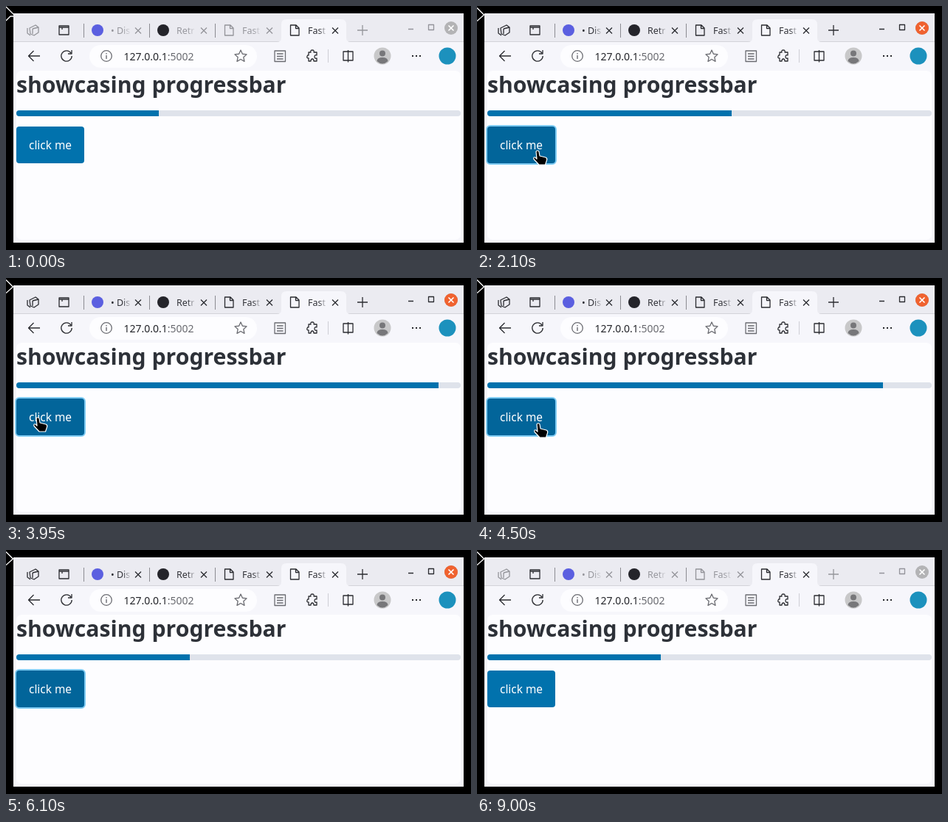
An HTML page that plays this animation: 630x332 px, repeating every 9050 ms.

```html
<!DOCTYPE html>
<html lang="en">
<head>
<meta charset="utf-8">
<title>Progress bar</title>
<style>
  html, body { margin: 0; width: 100%; height: 100%; overflow: hidden; background: #000; }
  svg { display: block; width: 630px; height: 332px; font-family: "Noto Sans", sans-serif; }
  .line { fill: none; stroke: #2b2c31; stroke-width: 1.3; stroke-linejoin: round; }
  .soft { stroke: #6b6c72; }
</style>
</head>
<body>
<svg viewBox="0 0 630 332">
  <defs>
    <linearGradient id="fade">
      <stop offset=".6" stop-color="#303137"/>
      <stop offset="1" stop-color="#303137" stop-opacity=".15"/>
    </linearGradient>
    <clipPath id="track"><rect x="14" y="142" width="602" height="8" rx="4"/></clipPath>
    <clipPath id="window"><rect x="10" y="10" width="610" height="312"/></clipPath>
    <path id="page-icon" class="line" d="M-5.500-7H2L6-3V7H-5.500ZM1.500-7V-2.500H6"/>
  </defs>

  <rect width="630" height="332"/>
  <path id="corner" fill="none" stroke="#fff" stroke-width="1.3"/>

  <!-- Window and page surfaces -->
  <rect x="10" y="10" width="610" height="312" fill="#ebebf1"/>
  <rect x="10" y="48" width="610" height="274" fill="#f6f6fb"/>
  <path d="M10 48.500H620" stroke="#d2d2d8"/>
  <path d="M367 49Q373 49 373 43V25Q373 18 380 18H454Q461 18 461 25V43Q461 49 467 49Z" fill="#f6f6fb"/>
  <rect x="14" y="88" width="602" height="230" rx="7" fill="#fdfdff"/>

  <!-- Tab strip -->
  <path class="line" d="M72 27H85V39H72ZM72 29H85M76 29V32"/>
  <path d="M105.500 24V43M194.500 24V43M283.500 24V43" stroke="#8c8c92"/>
  <g class="dims">
    <path class="line" d="M32 30L40 26L44 29V36L38 40L33 38ZM36 31L44 29M29 30V37L33 40M36 31V38"/>
    <path class="line" d="M476 33H490M483 26V40"/>
    <path class="line" d="M545 31.500H552M572.500 25.500H579.500V32.500H572.500Z"/>
  </g>
  <g id="tabs"></g>
  <circle cx="603" cy="30" r="9" fill="#b3b3b5"/>
  <circle id="close" cx="603" cy="30" r="9" fill="#f0622f"/>
  <path d="M599.500 26.500L606.500 33.500M606.500 26.500L599.500 33.500" stroke="#fff" stroke-width="1.600"/>

  <!-- Toolbar -->
  <path class="line" d="M46 68H31M37.500 61L30.500 68L37.500 75"/>
  <path class="line" d="M88 64A7.200 7.200 0 1 0 89.200 68M89 60V65H84"/>
  <rect x="113" y="53" width="227" height="31" rx="15.500" fill="#fdfdff"/>
  <circle class="line soft" cx="136" cy="68" r="7.300"/>
  <path d="M136 67V72M136 64V65.500" stroke="#6b6c72" stroke-width="1.400"/>
  <text x="159.500" y="74" font-size="14" fill="#25262b">127.0.0.1<tspan fill="#696a70">:5002</tspan></text>
  <path id="star" class="line soft"/>
  <path class="line soft" d="M364 61H378.500V75.500H364ZM367 65H375.500M367 68.500H375.500M367 72H375.500"/>
  <path class="line" d="M410 63H413Q412 60 415 60T417 63H421V67Q418 66 418 69T421 71V75H417Q417 72 415 72T413 75H410V71Q407 71 408 68.500T410 67Z"/>
  <path d="M436.500 59V77" stroke="#cfcfd5"/>
  <path class="line" d="M457 62H470V74H457ZM463.500 60V76.500"/>
  <circle cx="510" cy="68" r="11.500" fill="#c8c8c9"/>
  <circle cx="510" cy="64.500" r="4" fill="#77777a"/>
  <path d="M502.500 75Q503 70 510 70T517.500 75Q510 82 502.500 75Z" fill="#77777a"/>
  <path d="M550 68H552M555 68H557M560 68H562" stroke="#25262b" stroke-width="2"/>
  <circle cx="598" cy="68" r="11.500" fill="#1c91bd"/>

  <!-- Page content -->
  <text x="14" y="118" font-size="30.200" font-weight="700" fill="#2d3138">showcasing progressbar</text>
  <g clip-path="url(#track)">
    <rect x="14" y="142" width="602" height="8" fill="#dfe3eb"/>
    <rect id="progress" x="14" y="142" height="8" fill="#0172ad"/>
  </g>
  <rect x="14" y="164" width="92" height="50" rx="4" fill="#0172ad"/>
  <rect id="focused-button" x="13" y="163" width="94" height="52" rx="5" fill="#02659a" stroke="#80ccf3" stroke-width="2"/>
  <text x="31" y="195" font-size="15.400" fill="#fff">click me</text>
  <g clip-path="url(#window)">
    <path id="hand" stroke="#fff" stroke-width="1.200" stroke-linejoin="round"
      d="M-2 1Q0-1.500 2 1L3 7L11 9Q13.500 10 12.500 13L10.500 19H2L-5 11.500Q-6 8 -3 9L-1 11Z"/>
  </g>
</svg>
<script>
const LOOP = 9050;
const $ = id => document.getElementById(id);

// Favicons that are marks are shown as plain dots.
const tabs = [
  { label: "• Dis", dot: "#5b5fe0" },
  { label: "Retr", dot: "#24242a" },
  { label: "Fast" },
  { label: "Fast", active: true },
];
$("tabs").innerHTML = tabs.map(({ label, dot, active }, i) => {
  const icon = dot ? `<circle r="8" cy="33" fill="${dot}"/>` : "";
  const page = dot ? "" : `<use href="#page-icon" y="33"/>`;
  return `<g transform="translate(${124 + 89 * i} 0)">${icon}
    <g class="${active ? "" : "dims"}">${page}
      <text x="18" y="38" font-size="12.500" fill="url(#fade)">${label}</text>
      <path class="line" d="M51 29.500L59 37.500M59 29.500L51 37.500"/>
    </g></g>`;
}).join("");
const dimmed = document.querySelectorAll(".dims");

$("star").setAttribute("d", "M" + Array.from({ length: 10 }, (_, i) => {
  const angle = i * Math.PI / 5 - Math.PI / 2, radius = i % 2 ? 4 : 8.5;
  return `${318 + radius * Math.cos(angle)} ${68.5 + radius * Math.sin(angle)}`;
}).join("L") + "Z");

const ease = x => x * x * (3 - 2 * x);
const ramp = (t, start, length) => ease(Math.min(1, Math.max(0, (t - start) / length)));

// Each click moves the bar to a new value: [time, right edge].
const clicks = [[950, 345], [3400, 586], [4200, 550], [5100, 249]];
function barEdge(t) {
  let edge = 207;
  for (const [time, next] of clicks) edge += (next - edge) * ramp(t, time, 200);
  return edge;
}

// Fingertip path: [time, x, y].
const pointer = [
  [400, 130, 324], [800, 82, 199], [2100, 82, 197], [2900, 74, 206], [3400, 40, 205],
  [3950, 43, 190], [4500, 83, 198], [5100, 60, 201], [5700, 80, 200], [6000, 116, 324],
];
function pointerAt(t) {
  const i = pointer.findIndex(point => point[0] > t);
  if (i < 1) return [-100, -100];
  const [t0, x0, y0] = pointer[i - 1], [t1, x1, y1] = pointer[i];
  const k = ramp(t, t0, t1 - t0);
  return [x0 + (x1 - x0) * k, y0 + (y1 - y0) * k];
}

function draw(t) {
  const focus = ramp(t, 850, 200) - ramp(t, 7200, 200);
  dimmed.forEach(node => node.setAttribute("opacity", 0.45 + 0.55 * focus));
  $("close").setAttribute("opacity", focus);
  $("focused-button").setAttribute("opacity", ramp(t, 700, 200) - ramp(t, 7200, 200));
  $("progress").setAttribute("width", barEdge(t) - 14);
  $("hand").setAttribute("transform", `translate(${pointerAt(t)})`);
  $("corner").setAttribute("d", t < 500 ? "M0 1L13 14H6L0 20" : "M0 2.5L9.5 12L0 20.5");
}

const start = performance.now();
function frame() {
  draw((performance.now() - start) % LOOP);
  requestAnimationFrame(frame);
}
frame();
</script>
</body>
</html>
```
